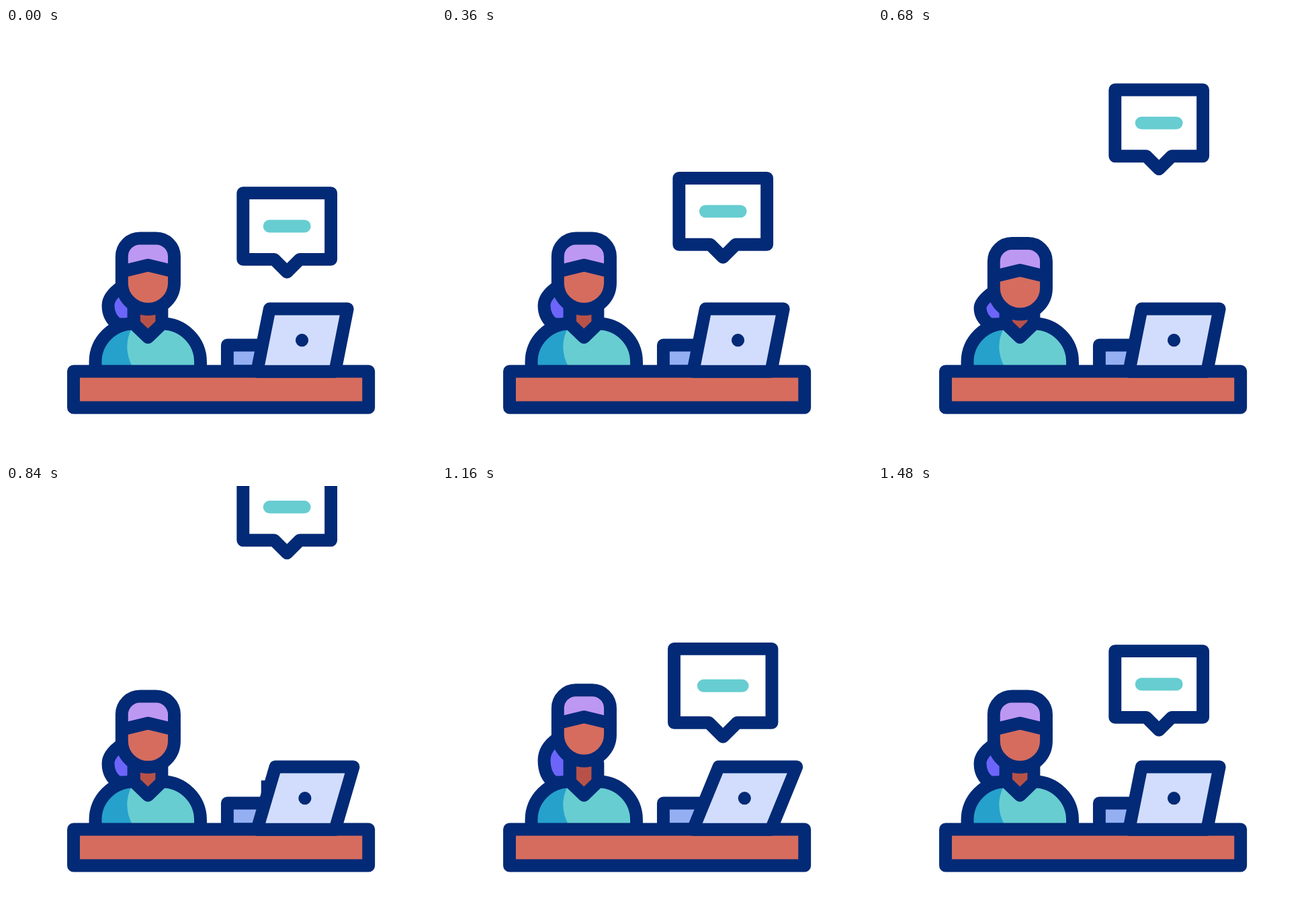
These frames come from a looping animation (640 px wide and 640 px high, 2000 ms). An HTML page with a canvas:

```html
<!DOCTYPE html>
<html lang="en">
<head>
<meta charset="utf-8">
<title>Reception desk</title>
<style>
  html, body { margin: 0; width: 100%; height: 100%; overflow: hidden; background: #fff; }
  canvas { display: block; width: 640px; height: 640px; }
</style>
</head>
<body>
<canvas id="stage" width="640" height="640"></canvas>
<script>
const ctx = document.getElementById('stage').getContext('2d');
const LOOP = 2000;
const LINE = 18.9;
const NAVY = '#032a76';
const SKIN = '#d66c5e';
const NECK = '#b85248';
const HAIR = '#bd98f3';
const TAIL = '#6d65fa';
const TEAL = '#67cdd1';
const SHADE = '#26a1cc';

const clamp = u => Math.min(1, Math.max(0, u));
const smooth = u => u * u * (3 - 2 * u);

// Eased interpolation through [time, value] pairs.
function track(keys, t) {
  if (t <= keys[0][0]) return keys[0][1];
  for (let i = 1; i < keys.length; i++) {
    const [t0, a] = keys[i - 1];
    const [t1, b] = keys[i];
    if (t <= t1) return a + (b - a) * smooth((t - t0) / (t1 - t0));
  }
  return keys[keys.length - 1][1];
}

function fill(path, color) {
  ctx.fillStyle = color;
  ctx.fill(new Path2D(path));
}

function stroke(path, color = NAVY) {
  ctx.strokeStyle = color;
  ctx.stroke(new Path2D(path));
}

function shape(path, color) {
  fill(path, color);
  stroke(path);
}

function drawBubble(y, s) {
  const w = 65.4 * s, h = 49.4 * s, notch = 19 * s, bar = 26 * s;
  ctx.save();
  ctx.translate(418.2, y);
  ctx.lineJoin = s < 0.5 ? 'miter' : 'round';
  shape(`M${-w} ${-h}H${w}V${h}H${notch}L0 ${h + notch}L${-notch} ${h}H${-w}Z`, '#fff');
  stroke(`M${-bar} 0H${bar}`, TEAL);
  ctx.restore();
}

function drawBubbles(t) {
  const rest = 295;
  if (t < 980) {
    const rise = 5.77e-4 * Math.max(0, t - 165) ** 2;
    drawBubble(rest - rise, 1);
  }
  if (t > 750) {
    const drop = 64.5 * (Math.max(0, 1184 - t) / 184) ** 1.6;
    const grow = 1.12 - 5.25e-6 * Math.max(0, 1200 - t) ** 2;
    const settle = 0.12 * smooth(clamp((t - 1240) / 240));
    drawBubble(rest + drop, Math.max(0.01, grow - settle));
  }
}

function drawPerson(dy) {
  const top = 385 + dy, mid = 413 + dy / 2;
  shape(`M190 ${top}H172Q152 ${top + 14} 152 ${mid}Q152 431 166 441H190Z`, TAIL);

  fill('M190.5 410H231.9V440L211.3 460.5L190.5 440Z', NECK);
  stroke('M190.5 412V440M231.9 412V440');

  const torso = 'M133 511V497A57 57 0 0 1 190 440L211.3 460.5L232.5 440A57 57 0 0 1 289.5 497V511';
  fill(torso, TEAL);
  fill('M133 511V497A57 57 0 0 1 187 440V447Q173 475 188 504V511Z', SHADE);
  stroke(torso);

  ctx.save();
  ctx.translate(0, dy);
  const head = 'M172.3 340A27 27 0 0 1 199.3 313H223.5A27 27 0 0 1 250.5 340V379.4A39.1 39.1 0 0 1 172.3 379.4Z';
  const fringe = 'M172.3 362.5L211.4 353L250.5 362.5';
  fill(head, SKIN);
  fill(fringe + 'V340A27 27 0 0 0 223.5 313H199.3A27 27 0 0 0 172.3 340Z', HAIR);
  stroke(head);
  stroke(fringe);
  ctx.restore();
}

function drawLaptop(lean) {
  shape(`M373.6 511.3L${392.3 + lean} 418H${508.2 + lean}L489.7 511.3Z`, '#d2ddfd');
  ctx.fillStyle = NAVY;
  ctx.beginPath();
  ctx.arc(440.5 + lean / 2, 464.7, 9.6, 0, Math.PI * 2);
  ctx.fill();
}

function draw(t) {
  const nod = track([[360, 0], [680, 7.5], [1040, -10.2], [1090, -10.2], [1480, 0]], t);
  const lean = track([[680, 0], [1040, 20.8], [1105, 20.8], [1480, 0]], t);

  ctx.fillStyle = '#fff';
  ctx.fillRect(0, 0, 640, 640);
  ctx.lineWidth = LINE;
  ctx.lineCap = ctx.lineJoin = 'round';

  drawBubbles(t);
  drawPerson(nod);
  shape('M329.4 511V472H390V511Z', '#94b0f3');
  shape('M100.5 511H539.7V565H100.5Z', SKIN);
  drawLaptop(lean);
}

function frame() {
  draw(performance.now() % LOOP);
  requestAnimationFrame(frame);
}
frame();
</script>
</body>
</html>
```
